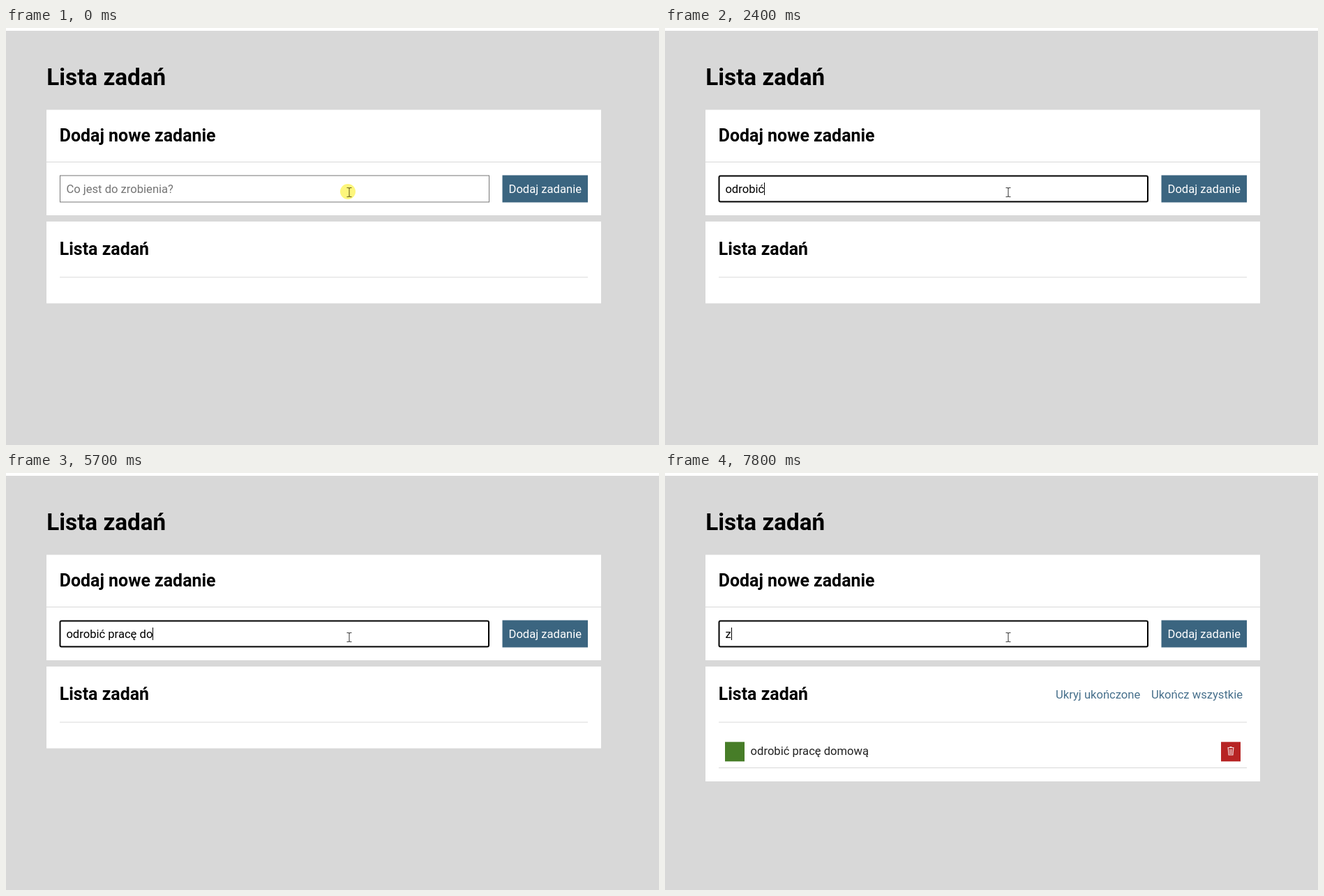
These frames come from a looping animation (936x599 px, 8 s). An HTML page:

```html
<!DOCTYPE html>
<html lang="pl">
<head>
<meta charset="utf-8">
<title>Lista zadań</title>
<style>
  html, body { margin: 0; width: 100%; height: 100%; overflow: hidden; background: #d8d8d8; }
  svg { display: block; }
  text { font: 16.6px Roboto, sans-serif; white-space: pre; }
  .h1 { font-size: 33.2px; font-weight: 700; }
  .h2 { font-size: 24.9px; font-weight: 700; }
  .link { fill: #47708c; }
  .rule { fill: #d9d9d9; }
</style>
</head>
<body>
<svg width="936" height="599" viewBox="0 0 936 599">
  <rect width="936" height="599" fill="#d8d8d8"/>
  <rect width="936" height="4" fill="#fff"/>
  <text class="h1" x="58.3" y="82">Lista zadań</text>

  <rect x="58" y="117.5" width="795" height="151.5" fill="#fff"/>
  <text class="h2" x="76.8" y="163">Dodaj nowe zadanie</text>
  <rect class="rule" x="58" y="192" width="795" height="1"/>
  <rect id="field" fill="#fff"/>
  <circle id="halo" cx="490" cy="235" r="11" fill="#fdf67c"/>
  <text id="entry" x="86.4" y="237"></text>
  <rect id="caret" y="222" width="1" height="18"/>
  <path id="beam" d="M488.5 229.5h2.5l1 1 1-1h2.5M492 230.5v11M488.5 242.5h2.5l1-1 1 1h2.5" fill="none" stroke-width="1.1"/>
  <rect x="711.5" y="211.5" width="122.5" height="39" fill="#3b6580"/>
  <text x="720.5" y="237" fill="#fff">Dodaj zadanie</text>

  <rect id="list" x="58" y="278" width="795" fill="#fff"/>
  <text class="h2" x="76.8" y="326">Lista zadań</text>
  <rect class="rule" x="77" y="357.5" width="757" height="1"/>
  <g id="task">
    <text class="link" x="560" y="324">Ukryj ukończone</text>
    <text class="link" x="696.9" y="324">Ukończ wszystkie</text>
    <rect x="86" y="386.3" width="28" height="28" fill="#477d28"/>
    <text x="122.6" y="405" fill="#222">odrobić pracę domową</text>
    <rect x="797" y="386.3" width="28" height="28" fill="#b72424"/>
    <g fill="none" stroke="#f0dada">
      <path d="M806.5 394.5h9M809.5 393.5h3M807.2 395l.9 10h5.8l.9-10" stroke-width="1.2"/>
      <path d="M809.6 396.5l.3 7.5M811 396.5v7.5M812.4 396.5l-.3 7.5" stroke-width=".8"/>
    </g>
    <rect class="rule" x="77" y="423" width="757" height="1"/>
  </g>
</svg>
<script>
const LOOP = 8000, PHRASE = 'odrobić pracę domową', ADDED = 7500;
// [time, letters typed]; a repeated count is a blink with the caret off
const typing = [
  [300, 1], [900, 3], [1200, 4], [1500, 5], [1800, 6], [2100, 6], [2400, 7],
  [2700, 8], [3000, 9], [3300, 10], [3600, 11], [3900, 12], [4200, 12],
  [4500, 13], [4800, 14], [5400, 15], [5700, 16], [6000, 18], [6600, 19],
  [6900, 20], [7200, 20]
];
const el = id => document.getElementById(id);
const set = (id, attrs) => {
  for (const name in attrs) el(id).setAttribute(name, attrs[name]);
};
const show = (id, on) => set(id, { visibility: on ? 'visible' : 'hidden' });

function typed(t) {
  if (t >= 7800) return ['z', true];
  if (t >= ADDED || t < 300) return ['', t >= ADDED];
  const i = typing.findLastIndex(step => step[0] <= t);
  const count = typing[i][1];
  return [PHRASE.slice(0, count), i === 0 || typing[i - 1][1] !== count];
}

function draw(now) {
  const t = now % LOOP, focused = t >= 300, added = t >= ADDED;
  const [text, caretOn] = typed(t);
  const entry = el('entry');

  entry.textContent = text;
  const end = Math.max(87, Math.round(86.4 + entry.getComputedTextLength()));
  if (!text) entry.textContent = 'Co jest do zrobienia?';
  set('entry', { fill: text ? '#000' : '#757575' });
  set('caret', { x: end });
  show('caret', caretOn);

  set('field', focused
    ? { x: 77.5, y: 212.5, width: 614.5, height: 37, rx: 2, stroke: '#000', 'stroke-width': 2 }
    : { x: 77.5, y: 212, width: 615, height: 38, rx: 0, stroke: '#767676', 'stroke-width': 1 });
  show('halo', !focused);
  set('beam', { stroke: focused ? '#444' : '#6b611f' });
  set('list', { height: added ? 165 : 117.5 });
  show('task', added);
  requestAnimationFrame(draw);
}
draw(0);
</script>
</body>
</html>
```
